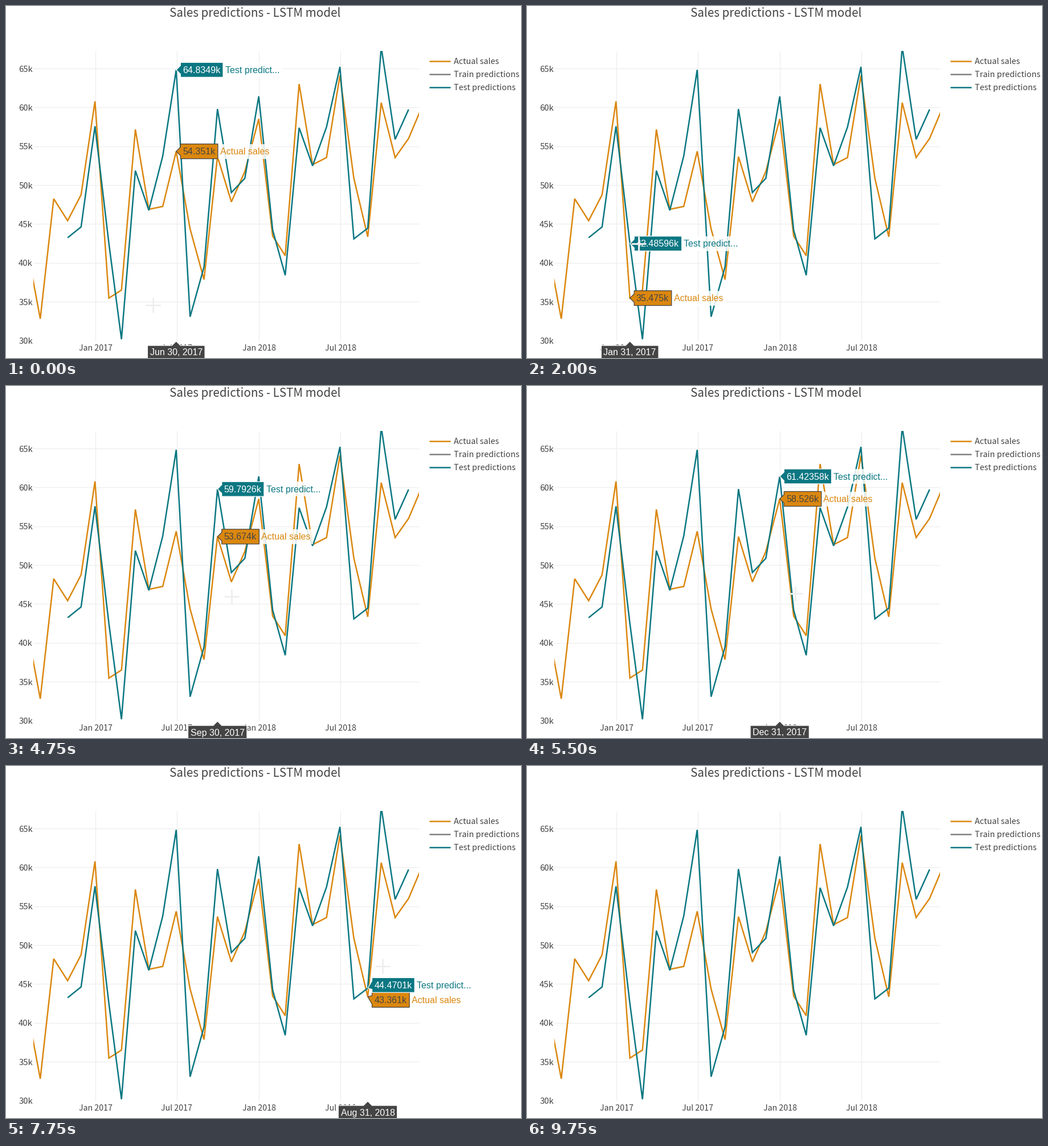
Write a matplotlib script that moves like this. It is 904 px wide and 619 px high and loops after 10 s.

```python
import numpy as np
import matplotlib.pyplot as plt
from matplotlib.animation import FuncAnimation
from matplotlib.patches import Polygon, Rectangle

W, H, DPI = 904, 619, 72  # at 72 dpi one point is one pixel
FRAMES, INTERVAL = 40, 250
ORANGE, TEAL, GRAY, DARK, GRID = "#db870f", "#0a7782", "#808080", "#444444", "#eeeeee"
UI, HOVER = "Noto Sans CJK JP", "Liberation Sans"
LEFT, RIGHT, TOP, BOTTOM = 48, 724.5, 79, 588.5
ARROW, PAD, BOX_H = 7.5, 3.75, 26

# Month-end values in thousands; actual starts in Jul 2016, test in Oct 2016
ACTUAL = [42.4, 32.816, 48.253, 45.431, 48.762, 60.785, 35.475, 36.512, 57.168,
          46.895, 47.264, 54.351, 44.371, 37.863, 53.674, 47.852, 51.764, 58.526,
          43.462, 40.928, 63.018, 52.635, 53.548, 64.119, 50.882, 43.361, 60.612,
          53.553, 56.004, 60.25]
TEST = [43.24126, 44.62835, 57.58147, 42.48596, 30.17924, 51.86738, 46.76219,
        53.74162, 64.8349, 33.07415, 39.47283, 59.7926, 49.05374, 50.87916,
        61.42358, 44.23167, 38.41529, 57.38743, 52.48799, 57.46812, 65.21934,
        43.09276, 44.4701, 67.78125, 55.89463, 59.73817]
TEST_START = 3
MONTHS = np.datetime64("2016-08", "M") + np.arange(len(ACTUAL))
DATES = MONTHS.astype("datetime64[D]") - 1

# Hovered month and pointer position at key frames
HOVER_KEYS = [0, 3, 4, 8, 9, 13, 19, 26, 29, 31, 32, 37, 38]
HOVER_MONTH = [11, 4, 4, 6, 7, 9, 14, 21, 23, 25, 25, 28, 28]
POINTER_KEYS = [0, 3, 4, 8, 13, 19, 26, 31, 32, 37, 38]
POINTER_X = [258, 157, 157, 196, 275, 396, 571, 661, 661, 732, 750]
POINTER_Y = [526, 470, 470, 418, 408, 370, 358, 352, 352, 345, 340]


def x_of(date):
    days = (np.asarray(date, "datetime64[D]") - np.datetime64("2017-01-01")).astype(float)
    return 157 + 0.7875 * days


def y_of(value):
    return BOTTOM - (np.asarray(value) - 30) * 13.671


fig = plt.figure(figsize=(W / DPI, H / DPI), dpi=DPI, facecolor="white")
ax = fig.add_axes([0, 0, 1, 1])
ax.set_xlim(0, W)
ax.set_ylim(H, 0)
ax.axis("off")
moving = []


def write(x, y, text, size, color=DARK, font=UI, ha="left", z=5):
    return ax.text(x, y, text, fontsize=size, color=color, family=font, ha=ha,
                   va="baseline", zorder=z)


def line(xs, ys, color, width, z=2):
    return ax.plot(xs, ys, color=color, lw=width, zorder=z,
                   solid_capstyle="butt", solid_joinstyle="miter")[0]


def draw_chart():
    write(436.7, 19, "Sales predictions - LSTM model", 20.6, ha="center")
    for k in range(30, 70, 5):
        y = float(y_of(k))
        if k > 30:
            line([LEFT, RIGHT], [y, y], GRID, 1.25, 1)
        write(47, y + 5.5, f"{k}k", 14.8, ha="right")
    for start, name in [("2017-01-01", "Jan 2017"), ("2017-07-01", "Jul 2017"),
                        ("2018-01-01", "Jan 2018"), ("2018-07-01", "Jul 2018")]:
        x = float(x_of(start))
        line([x, x], [TOP, BOTTOM], GRID, 1.25, 1)
        write(x, 606, name, 14.2, ha="center")

    area = Rectangle((LEFT, TOP), RIGHT - LEFT, BOTTOM - TOP, transform=ax.transData)
    xs = x_of(DATES)
    test_xs = xs[TEST_START:TEST_START + len(TEST)]
    for px, values, color in [(xs, ACTUAL, ORANGE), (test_xs, TEST, TEAL)]:
        line(px, y_of(values), color, 2.5, 3).set_clip_path(area)

    for row, (name, color) in enumerate([("Actual sales", ORANGE),
                                         ("Train predictions", GRAY),
                                         ("Test predictions", TEAL)]):
        y = 97 + 23 * row
        line([743, 779.5], [y, y], color, 2.5)
        write(786, y + 5.3, name, 14.4)


def keep(artist):
    moving.append(artist)
    return artist


def hover_text(x, y, text, color, z, ha="left"):
    label = keep(write(x, y, text, 16, color, HOVER, ha, z))
    return label.get_window_extent().width + 1


def polygon(points, color, edge, z):
    keep(ax.add_patch(Polygon(points, closed=True, fc=color, ec=edge, lw=1.25,
                              joinstyle="miter", zorder=z)))


def value_label(x, y, center, value, name, color, ink, z):
    left = x + ARROW
    width = hover_text(left + PAD, center + 5.6, f"{value:.7g}k", ink, z + 0.2) + 2 * PAD
    right, top, bottom = left + width, center - BOX_H / 2, center + BOX_H / 2
    polygon([(x, y), (left, center + ARROW), (left, bottom), (right, bottom),
             (right, top), (left, top), (left, center - ARROW)], color, ink, z + 0.1)
    name_width = hover_text(right + PAD, center + 5.6, name, color, z + 0.2) + 2 * PAD
    keep(ax.add_patch(Rectangle((right, top), name_width, BOX_H, fc="white",
                                ec="none", alpha=0.85, zorder=z)))


def date_label(x, date):
    text = date.item().strftime("%b %d, %Y")
    half = hover_text(x, 614.5, text, "white", 12, "center") / 2 + PAD
    tip, top = 589.5, 597
    polygon([(x, tip), (x + ARROW, top), (x + half, top), (x + half, H + 4),
             (x - half, H + 4), (x - half, top), (x - ARROW, top)], DARK, "white", 11)


def draw_hover(month):
    x = float(x_of(DATES[month]))
    actual, test = ACTUAL[month], TEST[month - TEST_START]
    y_actual, y_test = float(y_of(actual)), float(y_of(test))
    # Push overlapping labels apart evenly
    push = max(0, BOX_H - abs(y_actual - y_test)) / 2
    push = push if y_actual > y_test else -push
    value_label(x, y_actual, y_actual + push, actual, "Actual sales", ORANGE, DARK, 6)
    value_label(x, y_test, y_test - push, test, "Test predict...", TEAL, "white", 7)
    date_label(x, DATES[month])


def draw_pointer(x, y):
    keep(line([x - 13, x + 13], [y, y], "#efefef", 3, 15))
    keep(line([x, x], [y - 13, y + 13], "#efefef", 3, 15))


def clear():
    while moving:
        moving.pop().remove()
    return []


def update(frame):
    clear()
    if frame < FRAMES - 1:
        draw_hover(int(np.floor(np.interp(frame, HOVER_KEYS, HOVER_MONTH) + 0.5)))
        draw_pointer(np.interp(frame, POINTER_KEYS, POINTER_X),
                     np.interp(frame, POINTER_KEYS, POINTER_Y))
    return moving


draw_chart()
anim = FuncAnimation(fig, update, frames=FRAMES, init_func=clear,
                     interval=INTERVAL, repeat=True, repeat_delay=0, blit=False)
plt.show()
```
